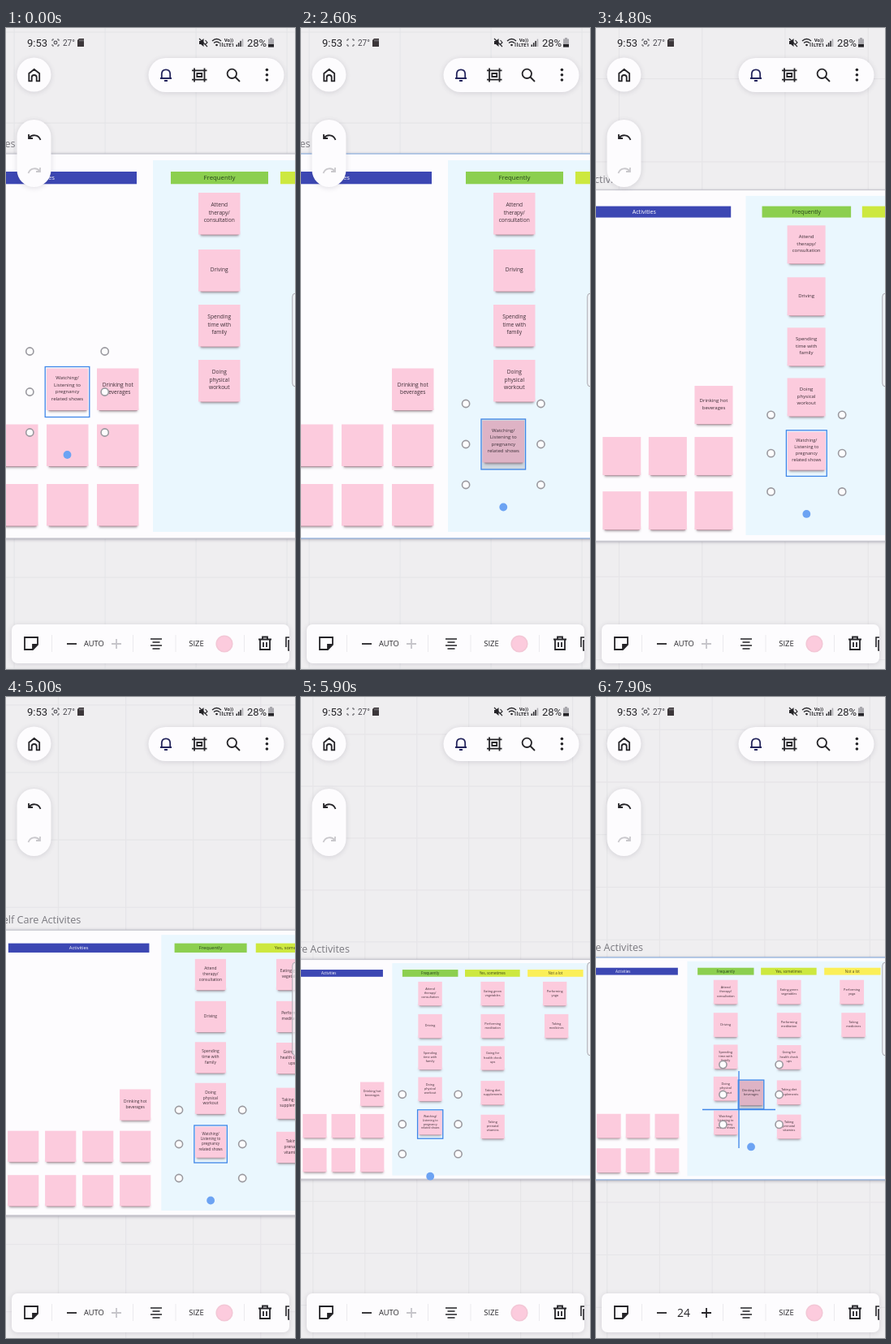
An HTML page with a canvas for the animation above (8000 ms loop, 356 by 790 pixels).

```html
<!DOCTYPE html>
<html lang="en">
<head>
<meta charset="utf-8">
<title>Self care board</title>
<style>
html, body { margin: 0; width: 100%; height: 100%; overflow: hidden; background: #efeef0; }
canvas { display: block; width: 356px; height: 790px; }
</style>
</head>
<body>
<canvas></canvas>
<script>
const W = 356, H = 790, LOOP = 8000, SIZE = 51.5;
const canvas = document.querySelector('canvas');
const c = canvas.getContext('2d');
const dpr = window.devicePixelRatio || 1;
canvas.width = W * dpr;
canvas.height = H * dpr;

const SANS = '"Open Sans", "Noto Sans", sans-serif';
const ROBOTO = 'Roboto, sans-serif';
const INK = '#252428', BLUE = '#3f86e8';

// Keys are [time, ...values], joined by straight segments
const CAMERA = [[4700, 1, 0, 0], [5000, .742, 57, 172.2], [5500, .654, 56.7, 217],
  [5900, .571, 9, 235], [6000, .578, 7.8, 231.4]];
const DRAG_WATCH = [[1500, 75.5, 448.5], [1600, 96, 457], [1800, 166.5, 487.5],
  [2200, 222, 505], [2700, 256, 515], [3300, 263, 510.5]];
const DRAG_DRINK = [[7500, 137.75, 448.5], [7600, 165, 450], [7900, 317, 447.4]];

const BARS = [[-73, 234, '#3c47b3', 'Activities', '#fff'], [203, 120, '#8ccf4f', 'Frequently', '#25401a'],
  [338, 118.5, '#cde83f', 'Yes, sometimes', '#3c4416'], [473, 120, '#fbef58', 'Not a lot', '#4a451c']];

const NOTES = [
  [237, 203, 'Attend|therapy/|consultation'], [237, 273, 'Driving'],
  [237, 341, 'Spending|time with|family'], [237, 409, 'Doing|physical|workout'],
  [372, 203, 'Eating green|vegetables'], [372, 273, 'Performing|meditation'],
  [372, 342, 'Going for|health check|ups'], [372, 417, 'Taking diet|supplements'],
  [372, 490, 'Taking|prenatal|vitamins'], [506, 203, 'Performing|yoga'], [509.5, 273, 'Taking|medicines']
];
for (const y of [488.5, 562])
  for (let i = 0; i < 4; i++) NOTES.push([-74 + 62 * i, y, '']);

function at(t, keys) {
  const i = keys.findIndex(k => k[0] > t);
  if (i === 0) return keys[0].slice(1);
  if (i < 0) return keys[keys.length - 1].slice(1);
  const a = keys[i - 1], b = keys[i], p = (t - a[0]) / (b[0] - a[0]);
  return a.slice(1).map((v, j) => v + (b[j + 1] - v) * p);
}

function rect(x, y, w, h, fill) {
  c.fillStyle = fill;
  c.fillRect(x, y, w, h);
}

function text(s, x, y, size, color, align = 'center', family = SANS, weight = 400) {
  c.font = `${weight} ${size}px ${family}`;
  c.fillStyle = color;
  c.textAlign = align;
  c.textBaseline = 'alphabetic';
  c.fillText(s, x, y + size * .36);
}

function line(d, color = INK, width = 1.8) {
  c.strokeStyle = color;
  c.lineWidth = width;
  c.stroke(new Path2D(d));
}

function shape(d, color = INK) {
  c.fillStyle = color;
  c.fill(new Path2D(d));
}

function disc(x, y, r, fill, stroke) {
  c.beginPath();
  c.arc(x, y, r, 0, 7);
  c.fillStyle = fill;
  c.fill();
  if (stroke) {
    c.strokeStyle = stroke;
    c.lineWidth = 1.6;
    c.stroke();
  }
}

function withShadow(color, blur, y, draw) {
  c.save();
  c.shadowColor = color;
  c.shadowBlur = blur * dpr;
  c.shadowOffsetY = y * dpr;
  draw();
  c.restore();
}

function pill(x, y, w, h, r) {
  withShadow('rgba(60,55,80,.16)', 6, 1, () => {
    c.beginPath();
    c.roundRect(x, y, w, h, r);
    c.fillStyle = '#fdfcfe';
    c.fill();
  });
}

function note([x, y, label]) {
  const b = y + SIZE;
  withShadow('rgba(60,40,50,.5)', 3, 1, () =>
    shape(`M${x + 2} ${b - 4}H${x + SIZE - 2}V${b + .8}H${x + 3}Z`, '#b9929f'));
  rect(x, y, SIZE, SIZE, '#fccbdd');
  if (!label) return;
  const rows = label.split('|');
  const [size, pitch] = rows.length > 3 ? [6.1, 8.5] : [6.6, 9.3];
  rows.forEach((s, i) =>
    text(s, x + SIZE / 2, y + 24.4 + (i - (rows.length - 1) / 2) * pitch, size, '#3c2d35'));
}

function board(scale, tx, ty, dragging) {
  // Grid
  c.fillStyle = '#e6e5e8';
  const step = 112 * scale;
  const first = o => ((o % step) + step) % step - step;
  for (let x = first(10 * scale + tx); x < W; x += step) c.fillRect(x - .5, 0, 1.2, H);
  for (let y = first(5 * scale + ty); y < H; y += step) c.fillRect(0, y - .5, W, 1.2);

  text('Self Care Activites', -92 * scale + tx, 155 * scale + ty - 13, 12.6, '#7b7a80', 'left');

  c.save();
  c.translate(tx, ty);
  c.scale(scale, scale);
  withShadow('rgba(50,45,70,.45)', 4, 1, () => rect(-92, 155, 1000, 474, '#fdfcfe'));
  c.strokeStyle = dragging ? '#8eb0de' : '#c9c8d0';
  c.lineWidth = 1.2 / scale;
  c.strokeRect(-92, 155, 1000, 474);
  rect(181, 163, 720, 458, '#eaf7fe');
  for (const [x, w, fill, label, ink] of BARS) {
    rect(x, 177, w, 15.3, fill);
    text(label, x + w / 2, 184.3, 7.8, ink);
  }
  NOTES.forEach(note);
  c.restore();
}

function selection(cx, cy, scale, dragged) {
  const box = [cx - 27.3 * scale, cy - 31 * scale, 54.6 * scale, 62 * scale];
  if (dragged) rect(...box, 'rgba(70,60,80,.17)');
  c.strokeStyle = BLUE;
  c.lineWidth = 1.3;
  c.strokeRect(...box);
  const dx = 27.5 * scale + 18.7, dy = 31 * scale + 19;
  for (const x of [-dx, dx])
    for (const y of [-dy, 0, dy]) disc(cx + x, cy + y, 4.6, '#fdfdfe', '#9a999f');
  disc(cx, cy + 31 * scale + 46.5, 4.9, '#6ca3f3');
}

function statusBar(t) {
  text('9:53', 26, 18, 13, INK, 'left', ROBOTO);
  line('M57 16V14H59M63 14H65V16M65 20V22H63M59 22H57V20', '#55545a', 1);
  const blink = Math.floor((t + 200) / 500) % 2 === 0;
  if (blink && !(t >= 5800 && t < 6000)) {
    c.beginPath();
    c.arc(61, 18, 1.9, 0, 7);
    c.strokeStyle = '#55545a';
    c.lineWidth = 1.1;
    c.stroke();
  }
  text('27°', 70, 18, 10, '#4b4a50', 'left', ROBOTO);
  shape('M90 13H96V23H88V15Z', '#3b3639');
  line('M91 14V16.5M93 14V16.5M95 14V16.5', '#aaa8ac', .7);

  shape('M238 16H240L243.5 13V23L240 20H238Z');
  line('M238 13L248 23M245.5 15L248 18L245.5 20', INK, 1.1);
  line('M254 16Q259.5 11 265 16M256 18.5Q259.5 15.5 263 18.5', INK, 1.4);
  disc(259.5, 21, 1.3, INK);
  line('M264 18V23M266.5 23V18', INK, .9);
  text('Vo))', 274.5, 15, 6, INK, 'center', ROBOTO, 700);
  text('LTE1', 274.5, 21, 6, INK, 'center', ROBOTO, 700);
  for (let i = 0; i < 4; i++) rect(283.5 + i * 2.4, 20.5 - i * 2.3, 1.5, 2.5 + i * 2.3, i < 3 ? INK : '#aaa9ae');
  text('28%', 297, 18, 13, INK, 'left', ROBOTO);
  rect(323, 13.5, 7, 10, '#a9a8ad');
  rect(325, 12, 3, 2, '#a9a8ad');
  rect(323, 20, 7, 3.5, INK);
}

function undoArrow(color) {
  line('M-7 -4V1H-2M-7 1C-3 -4.5 5 -4 7.5 3', color);
}

function topControls() {
  pill(13.5, 36.5, 42, 42, 21);
  line('M28.3 65.3V56L34.7 51L41.2 56V65.3H37.7V60.8Q37.7 58 34.7 58T31.7 60.8V65.3Z');

  pill(175.5, 37, 167, 42, 21);
  line('M190 62H204M191.8 62V56.5Q192 51.3 197 51.3T202.2 56.5V62M195 65H199', '#23245c');
  line('M232 49.5V66.5M244.5 49.5V66.5M229 52.3H247.5M229 63.7H247.5M235.3 56H241.2V60H235.3Z');
  c.beginPath();
  c.arc(278.3, 56.3, 5.7, 0, 7);
  c.strokeStyle = INK;
  c.lineWidth = 1.8;
  c.stroke();
  line('M282.5 60.5L288 66');
  for (const y of [51.5, 57.8, 64]) disc(321.4, y, 1.8, INK);

  pill(13.5, 113, 42, 83, 21);
  c.save();
  c.translate(35, 135);
  undoArrow(INK);
  c.translate(0, 41);
  c.scale(-1, 1);
  undoArrow('#c9c8cc');
  c.restore();
}

function toolbar(numeric) {
  pill(7, 735, 342, 48, 7);
  for (const x of [56, 156, 208.5, 293]) rect(x, 748, 1, 21, '#ebeaee');
  line('M23 751H39V760L33 766H23ZM39 760H33V766');
  shape('M33 760H39L33 766Z');
  line('M75 759H87');
  if (numeric) text('24', 108, 759, 14, INK);
  else text('AUTO', 108.3, 759, 9.3, INK);
  line('M130 759H142M136 753V765', numeric ? INK : '#c6c5ca');
  line('M178 753H192M180.5 757H189.5M178 761H192M180.5 765H189.5', INK, 1.6);
  text('SIZE', 234.5, 759, 9.5, INK);
  disc(269, 759, 9.8, '#fccbdd', '#f3c7d6');
  line('M311 753.5H327M316 753V750.5H322V753M313 754V766H325V754M317 757V763M321 757V763');
  line('M349 751H345V763M349 755H348V767H349', INK, 1.6);
}

function draw(t) {
  const [scale, tx, ty] = at(t, CAMERA);
  const watchDrag = t >= 1600 && t < 4200, drinkDrag = t >= 7600;
  const drinkSelected = t >= 6900, dragging = watchDrag || drinkDrag;
  const watch = at(t, DRAG_WATCH), drink = at(t, DRAG_DRINK);

  c.setTransform(dpr, 0, 0, dpr, 0, 0);
  rect(0, 0, W, H, '#efeef0');
  board(scale, tx, ty, dragging);

  c.save();
  c.translate(tx, ty);
  c.scale(scale, scale);
  const place = ([x, y], label) => note([x - SIZE / 2, y - 29, label]);
  const drawDrink = () => place(drink, 'Drinking hot|beverages');
  if (!drinkSelected) drawDrink();
  place(watch, 'Watching/|Listening to|pregnancy|related shows');
  if (drinkSelected) drawDrink();
  c.restore();

  const [x, y] = drinkSelected ? drink : watch;
  selection(x * scale + tx, y * scale + ty, scale, dragging);
  if (watchDrag && t >= 3300) line('M263 393V550M97 480H302', BLUE, 1.3);
  if (t >= 7850) line('M176 461V556M131 508.5H221', BLUE, 1.3);

  // Edge panel handle
  c.beginPath();
  c.roundRect(352.8, 327, 12, 115, 4);
  c.fillStyle = 'rgba(245,246,249,.7)';
  c.fill();
  c.strokeStyle = '#aaa9b0';
  c.lineWidth = 1;
  c.stroke();

  statusBar(t);
  topControls();
  toolbar(drinkSelected);
}

const start = performance.now();
function frame() {
  draw((performance.now() - start) % LOOP);
  requestAnimationFrame(frame);
}
frame();
</script>
</body>
</html>
```
